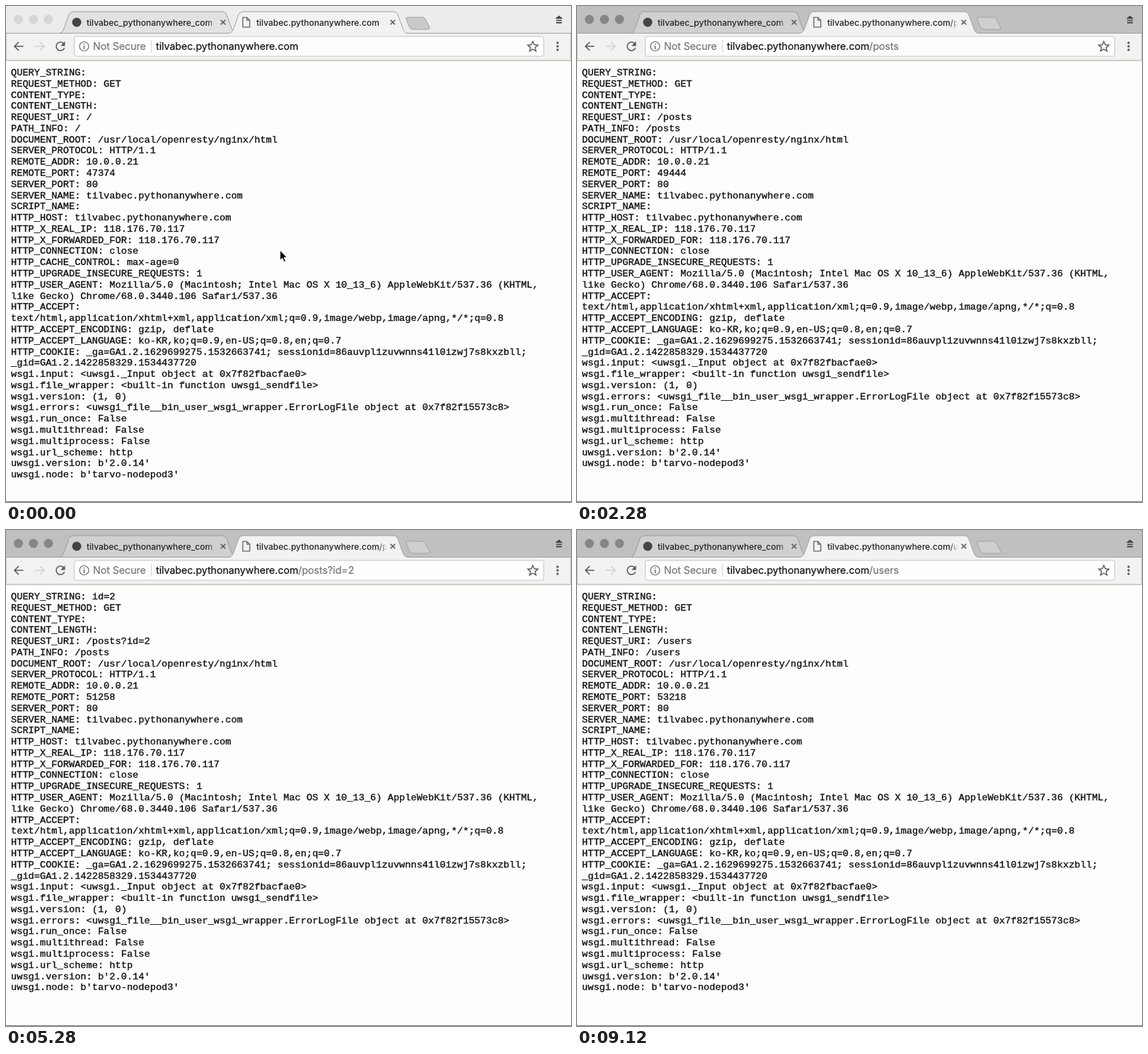
An HTML page for the animation above (9.18 s loop, 799 px wide and 701 px high).

```html
<!DOCTYPE html>
<html lang="en">
<head>
<meta charset="utf-8">
<title>Request headers</title>
<style>
  html, body { margin: 0; width: 100%; height: 100%; overflow: hidden; background: #fdfdfc; }
  svg { display: block; width: 799px; height: 701px; }
  text { white-space: pre; }
  .ui { font: 14.15px Inter, Roboto, sans-serif; fill: #111; stroke: #111; stroke-width: .22; }
  .tab { font: 500 12px Inter, Roboto, sans-serif; fill: #222; }
  .small { font: 11.4px Inter, Roboto, sans-serif; fill: #222; }
  .page { font: 13.66px "Liberation Mono", "Courier New", monospace; fill: #111; stroke: #111; stroke-width: .35; }
  .line { fill: none; stroke: #5a5a5a; stroke-width: 1.6; }
  .thin { fill: none; stroke: #666; stroke-width: 1.2; }
  .path { fill: #757575; stroke: #757575; }
  .link { fill: #1a57c8; stroke: #1a57c8; }
  .match { font-weight: 700; font-size: 14.6px; stroke: none; }
</style>
</head>
<body>
<svg viewBox="0 0 799 701">
  <defs>
    <linearGradient id="fade1" gradientUnits="userSpaceOnUse" x1="284" x2="300" y1="0" y2="0">
      <stop stop-color="#fff"/><stop offset="1" stop-color="#000"/>
    </linearGradient>
    <linearGradient id="fade2" gradientUnits="userSpaceOnUse" x1="527" x2="539" y1="0" y2="0">
      <stop stop-color="#fff"/><stop offset="1" stop-color="#000"/>
    </linearGradient>
    <linearGradient id="shade" x1="0" x2="0" y1="0" y2="1">
      <stop stop-color="#000" stop-opacity=".16"/><stop offset="1" stop-color="#000" stop-opacity="0"/>
    </linearGradient>
    <mask id="mask1" maskUnits="userSpaceOnUse" x="0" y="0" width="799" height="40">
      <rect width="799" height="40" fill="url(#fade1)"/>
    </mask>
    <mask id="mask2" maskUnits="userSpaceOnUse" x="0" y="0" width="799" height="40">
      <rect width="799" height="40" fill="url(#fade2)"/>
    </mask>
    <clipPath id="chipClip"><rect id="chipArea" x="120" y="44" width="80" height="26"/></clipPath>
    <g id="doc"><path class="thin" d="M-4 -6H1L4.5 -2.5V6H-4ZM1 -6V-2.5H4.5"/></g>
    <path id="cross" class="line" d="M-3.3 -3.3L3.3 3.3M3.3 -3.3L-3.3 3.3"/>
  </defs>

  <rect width="799" height="701" fill="#fdfdfc"/>
  <g id="page" class="page"></g>

  <rect id="bar" width="799" height="39"/>
  <g id="lights"><circle cx="17.5" cy="19" r="6.4"/><circle cx="38.8" cy="19" r="6.4"/><circle cx="60" cy="19" r="6.4"/></g>
  <path id="backTab" d="M75 38.5C80 38 81 34 83 29L89 12Q91 8 95 8H306Q310 8 312 12L318 29C320 34 321 38 326 38.5Z" stroke="#9a9a9a"/>
  <path id="newTab" d="M567 16H589Q592 16 593 18.5L599 30Q600 33 597 33H575Q572 33 571 30.5L566 19Q565 16 567 16Z" stroke="#a2a2a2"/>
  <path d="M0 38.5H315C320 38 321 34 323 29L329 12Q331 8 335 8H548Q552 8 554 12L560 29C562 34 563 38 568 38.5H799V77H0Z" fill="#f2f2f1" stroke="#a0a0a0"/>
  <path d="M0 76.5H799" stroke="#cfcfc2"/>
  <circle cx="100" cy="23" r="6.5" fill="#444"/>
  <text class="tab" x="114" y="27.5" mask="url(#mask1)" id="title1"></text>
  <use href="#cross" x="307" y="23"/>
  <use href="#doc" transform="translate(339.5 23) scale(1.15)"/>
  <text class="tab" x="354" y="27.5" mask="url(#mask2)" id="title2"></text>
  <use href="#cross" x="547" y="23"/>
  <path d="M782 13.5L787.5 18H776.5ZM778 19.5H786V21H778ZM778 22.5H786V24.5H778Z" fill="#444"/>

  <path class="line" d="M24.5 57H12M18 51L12 57L18 63"/>
  <path class="line" d="M41 57H53.5M48 51L54 57L48 63" style="stroke:#d2d2d2"/>
  <path class="line" d="M81.5 53A6 6 0 1 0 82.7 59"/>
  <path d="M83.5 50V56.5H77Z" fill="#5a5a5a"/>
  <g fill="#5a5a5a"><circle cx="780" cy="52" r="1.7"/><circle cx="780" cy="57" r="1.7"/><circle cx="780" cy="62" r="1.7"/></g>

  <rect id="box" x="96.5" y="43" width="664" height="28" rx="3" fill="#fefefe"/>
  <use id="docIcon" href="#doc" x="110" y="57"/>
  <g id="info">
    <circle class="thin" cx="110.5" cy="57" r="6.5"/>
    <path d="M110.5 56V61M110.5 53V54.6" stroke="#666" stroke-width="1.5"/>
  </g>
  <g clip-path="url(#chipClip)"><text id="chip" class="ui path" y="62.2">Not Secure</text></g>
  <path id="divider" d="M205.5 48V66" stroke="#d4d4d4"/>
  <rect id="selection" y="48" height="19" fill="#c8c8cc"/>
  <text id="url" class="ui" y="62.2"></text>
  <rect id="caret" y="48" width="1.2" height="18" fill="#111"/>
  <path id="star" class="line" style="stroke-width:1.4" d="M745 50L747.1 54.8L752.2 55.2L748.3 58.6L749.5 63.7L745 61L740.5 63.7L741.7 58.6L737.8 55.2L742.9 54.8Z"/>

  <g id="menu"></g>

  <g id="status">
    <path d="M-1 682.5H262Q265.5 682.5 265.5 686V702H-1Z" fill="#e8e8e8" stroke="#b2b2b2"/>
    <text class="small" x="3" y="696" id="waiting"></text>
  </g>
  <path d="M0 700.5H799" stroke="#777"/>
  <path id="cursor" d="M387.5 345V359.5L390.8 356.5L393.2 361.8L395.6 360.7L393.3 355.6H397.6Z" fill="#111" stroke="#fff"/>
</svg>
<script>
const LOOP = 9180, STEP = 60, ROW = 26.35;
const HOST = 'tilvabec.pythonanywhere.com';
const $ = id => document.getElementById(id);
const esc = s => s.replace(/&/g, '&amp;').replace(/</g, '&lt;');
const set = (id, attrs) => { for (const k in attrs) $(id).setAttribute(k, attrs[k]); };
const show = (id, on) => set(id, { opacity: +on });
const lastBefore = (list, t) => list.filter(e => e.at <= t).pop();

// Page loads
const loads = [
  { at: -1000, path: '', port: 47374 },
  { at: 1980, path: '/posts', port: 49444 },
  { at: 3840, path: '/posts?id=1', port: 50636 },
  { at: 4920, path: '/posts?id=2', port: 51258 },
  { at: 7500, path: '/users', port: 53218 }
];
const ENTER = 180, CHIP = 150, STATUS = 280;

// Address bar states
const steps = [];
const step = (at, mode, path) => steps.push({ at, mode, path });
const type = (at, gap, base, added) =>
  [...added].forEach((c, i) => step(at + i * gap, 'edit', base + added.slice(0, i + 1)));

step(0, 'idle', '');
step(600, 'select', '');
type(960, 120, '', '/posts');
step(1800, 'wait', '/posts');
step(1980, 'idle', '/posts');
step(2700, 'select', '/posts');
step(3180, 'edit', '/posts?');
type(3300, 80, '/posts?', 'id=1');
step(3660, 'wait', '/posts?id=1');
step(3840, 'idle', '/posts?id=1');
step(4120, 'select', '/posts?id=1');
step(4440, 'edit', '/posts?id=');
step(4560, 'edit', '/posts?id=2');
step(4740, 'wait', '/posts?id=2');
step(4920, 'idle', '/posts?id=2');
step(6300, 'select', '/posts?id=2');
type(6780, 80, '', '/users');
step(7320, 'wait', '/users');
step(7500, 'idle', '/users');

function headers({ path, port }) {
  const [bare, query = ''] = path.split('?');
  return `QUERY_STRING: ${query}
REQUEST_METHOD: GET
CONTENT_TYPE:
CONTENT_LENGTH:
REQUEST_URI: ${path || '/'}
PATH_INFO: ${bare || '/'}
DOCUMENT_ROOT: /usr/local/openresty/nginx/html
SERVER_PROTOCOL: HTTP/1.1
REMOTE_ADDR: 10.0.0.21
REMOTE_PORT: ${port}
SERVER_PORT: 80
SERVER_NAME: ${HOST}
SCRIPT_NAME:
HTTP_HOST: ${HOST}
HTTP_X_REAL_IP: 118.176.70.117
HTTP_X_FORWARDED_FOR: 118.176.70.117
HTTP_CONNECTION: close
${path ? '' : 'HTTP_CACHE_CONTROL: max-age=0\n'}HTTP_UPGRADE_INSECURE_REQUESTS: 1
HTTP_USER_AGENT: Mozilla/5.0 (Macintosh; Intel Mac OS X 10_13_6) AppleWebKit/537.36 (KHTML,
like Gecko) Chrome/68.0.3440.106 Safari/537.36
HTTP_ACCEPT:
text/html,application/xhtml+xml,application/xml;q=0.9,image/webp,image/apng,*/*;q=0.8
HTTP_ACCEPT_ENCODING: gzip, deflate
HTTP_ACCEPT_LANGUAGE: ko-KR,ko;q=0.9,en-US;q=0.8,en;q=0.7
HTTP_COOKIE: _ga=GA1.2.1629699275.1532663741; sessionid=86auvpl1zuvwnns41l0izwj7s8kxzbll;
_gid=GA1.2.1422858329.1534437720
wsgi.input: <uwsgi._Input object at 0x7f82fbacfae0>
wsgi.file_wrapper: <built-in function uwsgi_sendfile>
wsgi.version: (1, 0)
wsgi.errors: <uwsgi_file__bin_user_wsgi_wrapper.ErrorLogFile object at 0x7f82f15573c8>
wsgi.run_once: False
wsgi.multithread: False
wsgi.multiprocess: False
wsgi.url_scheme: http
uwsgi.version: b'2.0.14'
uwsgi.node: b'tarvo-nodepod3'`.split('\n');
}

const pageMarkup = load => headers(load)
  .map((s, i) => `<text x="7" y="${(98 + i * 15.78).toFixed(2)}">${esc(s)}</text>`).join('');

function suggestions(typed) {
  const past = ['/ccxzczx?x=1', '/posts?id=1', '/post/1?x=1'];
  const near = typed.includes('?') ? past.filter(p => p.startsWith('/posts?')) : past;
  return [...new Set([typed, ...near])];
}

function shared(a, b) {
  let n = 0;
  while (n < a.length && a[n] === b[n]) n++;
  return n;
}

function menuMarkup(typed) {
  const rows = suggestions(typed), end = 81 + (rows.length + 1) * ROW + 4;
  const mid = i => 94.5 + i * ROW;
  const last = mid(rows.length);
  return `<rect y="${end}" width="799" height="6" fill="url(#shade)"/>
    <rect y="77" width="799" height="${end - 77}" fill="#fdfdfd"/>
    <rect y="81" width="799" height="26.3" fill="#e6e6e6"/>` +
    rows.map((path, i) => {
      const n = shared(path, typed);
      return `<use href="#doc" x="110" y="${mid(i)}"/>
        <text class="ui" x="124" y="${mid(i) + 5.2}"><tspan class="link match">${HOST + path.slice(0, n)}</tspan><tspan class="link">${path.slice(n)}</tspan></text>`;
    }).join('') +
    `<g transform="translate(109 ${last})"><circle class="line" cx="-.5" cy="-1" r="4"/><path class="line" d="M2.5 2L7 6.5"/></g>
    <text class="ui" x="124" y="${last + 5.2}">${HOST + typed}<tspan class="path"> - Quovia Search</tspan></text>`;
}

// Rewrites markup only when its key changes
const drawn = {};
function fill(id, key, make) {
  if (drawn[id] === key) return;
  drawn[id] = key;
  $(id).innerHTML = make();
}

function render(t) {
  const { mode, path } = lastBefore(steps, t);
  const load = lastBefore(loads, t);
  const active = t >= 360, edit = mode === 'edit', wait = mode === 'wait';
  const open = edit || wait ? 0 : Math.min(1, (t - load.at) / CHIP);

  set('bar', { fill: active ? '#c0c0c0' : '#ececeb' });
  set('lights', { fill: active ? '#868686' : '#d6d6d6' });
  set('backTab', { fill: active ? '#d0d0d0' : '#e2e2e1' });
  set('newTab', { fill: active ? '#cfcfcf' : '#cacaca' });
  show('cursor', t < 540);

  fill('page', load.at, () => pageMarkup(load));
  fill('title2', load.path, () => HOST + load.path);

  const x = 124 + 88 * open;
  fill('url', path, () => `${HOST}<tspan class="path">${path}</tspan>`);
  set('url', { x });
  const width = $('url').getComputedTextLength();
  set('selection', { x, width });
  show('selection', mode === 'select');
  set('caret', { x: x + width + .5 });
  show('caret', edit);
  set('box', { stroke: edit ? '#a2a2a2' : '#c6c6c6' });

  show('docIcon', open === 0);
  show('info', open && .3 + .7 * open);
  set('chip', { x: 123 + 15 * (1 - open), opacity: open });
  $('chip').style.fontSize = 14.15 * (.3 + .7 * open) + 'px';
  set('chipArea', { width: Math.max(0, x - 132) });
  show('divider', open === 1);
  show('star', !edit);

  fill('menu', edit ? path : '', () => edit ? menuMarkup(path) : '');

  const busy = loads.find(l => t >= l.at - ENTER && t < l.at + STATUS);
  show('status', !!busy);
}

$('title1').textContent = HOST.replace(/\./g, '_');
$('waiting').textContent = `Waiting for ${HOST}...`;

const start = performance.now();
function tick() {
  const t = (performance.now() - start) % LOOP;
  render(Math.floor(t / STEP) * STEP);
  requestAnimationFrame(tick);
}
tick();
</script>
</body>
</html>
```
